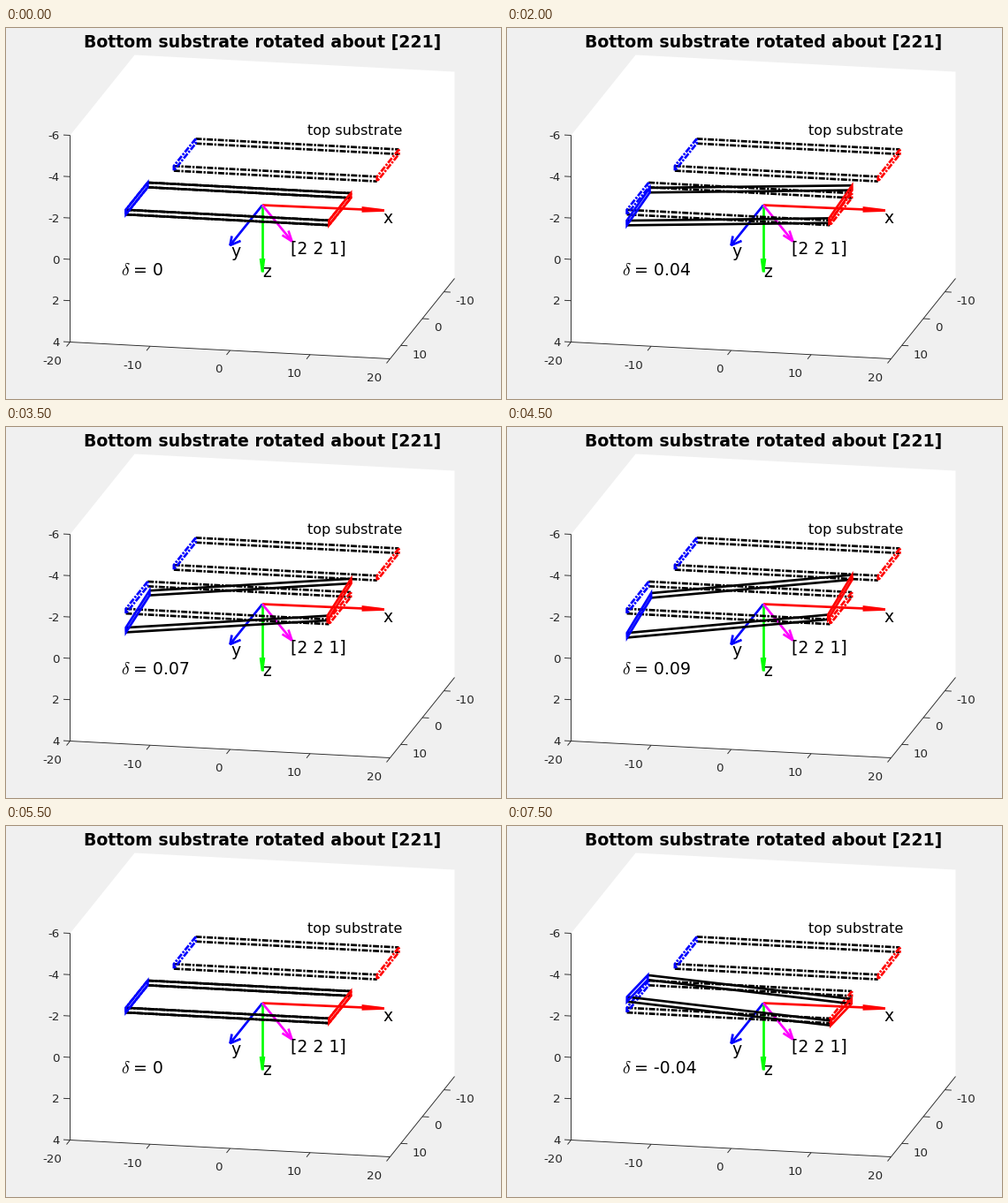
These frames come from a looping animation (560 by 420 pixels, 8000 ms). A matplotlib script:

```python
import numpy as np
import matplotlib.pyplot as plt
from matplotlib.animation import FuncAnimation
from matplotlib.patches import Polygon

W, H, DPI = 560, 420, 100
PT = 72 / DPI
LW = 2.67
GREY = "0.15"
BIG, MEDIUM, SMALL = 18.85, 16, 13.33
plt.rcParams["font.family"] = "DejaVu Sans"
plt.rcParams["mathtext.fontset"] = "cm"

# Orthographic view: screen position of the origin and of each unit step
ORIGIN = np.array([289.5, 225.4])
STEP = np.array([[9.05, 0.475], [-2.433, 3.033], [0, 23.4]])
AXIS = np.array([2, 2, 1]) / 3
HALF = np.array([12.7, 5.08, 0.114])
BOTTOM = np.array([-3, 0, -1.085])
TOP = np.array([3, 0, -3.325])
PIVOT = np.array([0, 0, -1.085])

fig = plt.figure(figsize=(W / DPI, H / DPI), dpi=DPI, facecolor="#f0f0f0")
ax = fig.add_axes([0, 0, 1, 1])
ax.set_xlim(-0.5, W - 0.5)
ax.set_ylim(H - 0.5, -0.5)
ax.axis("off")


def project(p):
    return ORIGIN + np.asarray(p) @ STEP


def stroke(pts, color, width=LW, **kw):
    x, y = np.transpose(pts)
    return ax.plot(x, y, color=color, lw=width * PT, solid_capstyle="butt",
                   dash_capstyle="butt", **kw)[0]


def label(x, y, s, size=BIG, **kw):
    return ax.text(x, y, s, fontsize=size * PT, va="baseline", **kw)


def rotate(p, angle):
    """Rodrigues rotation about AXIS through PIVOT."""
    r = p - PIVOT
    c, s = np.cos(angle), np.sin(angle)
    along = np.outer(r @ AXIS, AXIS)
    return PIVOT + r * c + np.cross(AXIS, r) * s + along * (1 - c)


def corners(center):
    """Left face then right face, each as a loop of four corners."""
    loop = [(-1, -1), (1, -1), (1, 1), (-1, 1)]
    return np.array([center + HALF * (sx, sy, sz)
                     for sx in (-1, 1) for sy, sz in loop])


def miter(p, a, b):
    """Pointed outer join at p of the edges towards a and b."""
    u = (a - p) / np.linalg.norm(a - p)
    v = (b - p) / np.linalg.norm(b - p)
    cross = u[0] * v[1] - u[1] * v[0]
    tip = p - (u + v) * LW / 2 / abs(cross)
    side = np.sign(cross) * LW / 2
    na = np.array([u[1], -u[0]]) * side
    nb = np.array([-v[1], v[0]]) * side
    return [tip, p + na, p, p + nb]


class Plate:
    def __init__(self, z, **style):
        blank = np.zeros((2, 2))
        self.sides = [stroke(blank, "black", zorder=z, **style) for _ in range(4)]
        self.faces, self.tips = [], []
        for color in ("blue", "red"):
            self.faces.append(ax.add_patch(Polygon(
                np.zeros((4, 2)), closed=True, fill=False, ec=color,
                lw=LW * PT, joinstyle="miter", capstyle="butt",
                zorder=z + 0.1, **style)))
            if not style:
                self.tips += [ax.add_patch(Polygon(
                    np.zeros((4, 2)), fc=color, lw=0, zorder=z + 0.2))
                    for _ in range(2)]

    def place(self, pts):
        q = project(pts)
        for i, line in enumerate(self.sides):
            line.set_data(*q[[i, i + 4]].T)
        for k, face in enumerate(self.faces):
            f = q[4 * k:4 * k + 4]
            face.set_xy(f)
            # the two sharp corners of the face: back top and front bottom
            for tip, i in zip(self.tips[2 * k:2 * k + 2], (0, 2)):
                tip.set_xy(miter(f[i], f[i - 1], f[i + 1]))


def arrow(tip, barbs, color):
    stroke([project(PIVOT), tip], color, zorder=3)
    stroke([barbs[0], tip, barbs[1]], color, zorder=3, solid_joinstyle="bevel")


def tick(p, dx, dy):
    x, y = project(p)
    stroke([(x, y), (x + dx, y + dy)], GREY, 0.9)
    return x, y


def draw_box():
    ax.add_patch(Polygon([(72, 121), (145, 30), (507, 49), (507, 283),
                          (434, 374), (72, 355)], fc="white", lw=0))
    stroke([(72, 121), (72, 355), (434, 374), (507, 283)], GREY, 0.9)
    for v in range(-20, 21, 10):
        x, y = tick((v, 15, 4), -4, 5)
        label(x - 9.1, y + 25.4, str(v), SMALL, ha="right", color=GREY)
    for v in (-10, 0, 10):
        x, y = tick((20, v, 4), 7.5, 0.4)
        label(x + 13.2, y + 14.3, str(v), SMALL, color=GREY)
    for v in range(-6, 5, 2):
        x, y = tick((-20, 15, v), -7.5, -0.4)
        label(59.8, y + 4.8, str(v), SMALL, ha="right", color=GREY)


draw_box()
label(289.2, 21.8, "Bottom substrate rotated about [221]", ha="center",
      weight="bold")
label(340.5, 120.8, "top substrate", MEDIUM)

arrow((427.3, 206), [(402, 202.9), (402, 206.9)], "red")
arrow((253, 245.5), [(255, 235), (265, 240.5)], "blue")
arrow((289.5, 275.5), [(287.5, 260.5), (291.5, 260.5)], "lime")
arrow((323, 241), [(312, 234), (319, 229)], "magenta")
label(425.5, 221, "x")
label(253.5, 259, "y")
label(289.5, 281.5, "z")
label(353.1, 255, "[2 2 1]", ha="center")
label(129.5, 279.5, r"$\delta$", 19.5)
value = label(144, 279.5, "")

dash_dot = {"ls": (0, (2.6, 0.6, 0.9, 0.6))}
Plate(4, **dash_dot).place(corners(TOP))
Plate(5, **dash_dot).place(corners(BOTTOM))
plate = Plate(6)


def update(i):
    # up to 0.1 in steps of 0.01, then a jump back and on to negative angles
    delta = i / 100 if i <= 10 else (11 - i) / 100
    plate.place(rotate(corners(BOTTOM), delta))
    value.set_text(f"= {delta:g}")
    return []


anim = FuncAnimation(fig, update, frames=16, init_func=lambda: update(0),
                     interval=500, repeat=True, repeat_delay=0)
plt.show()
```
